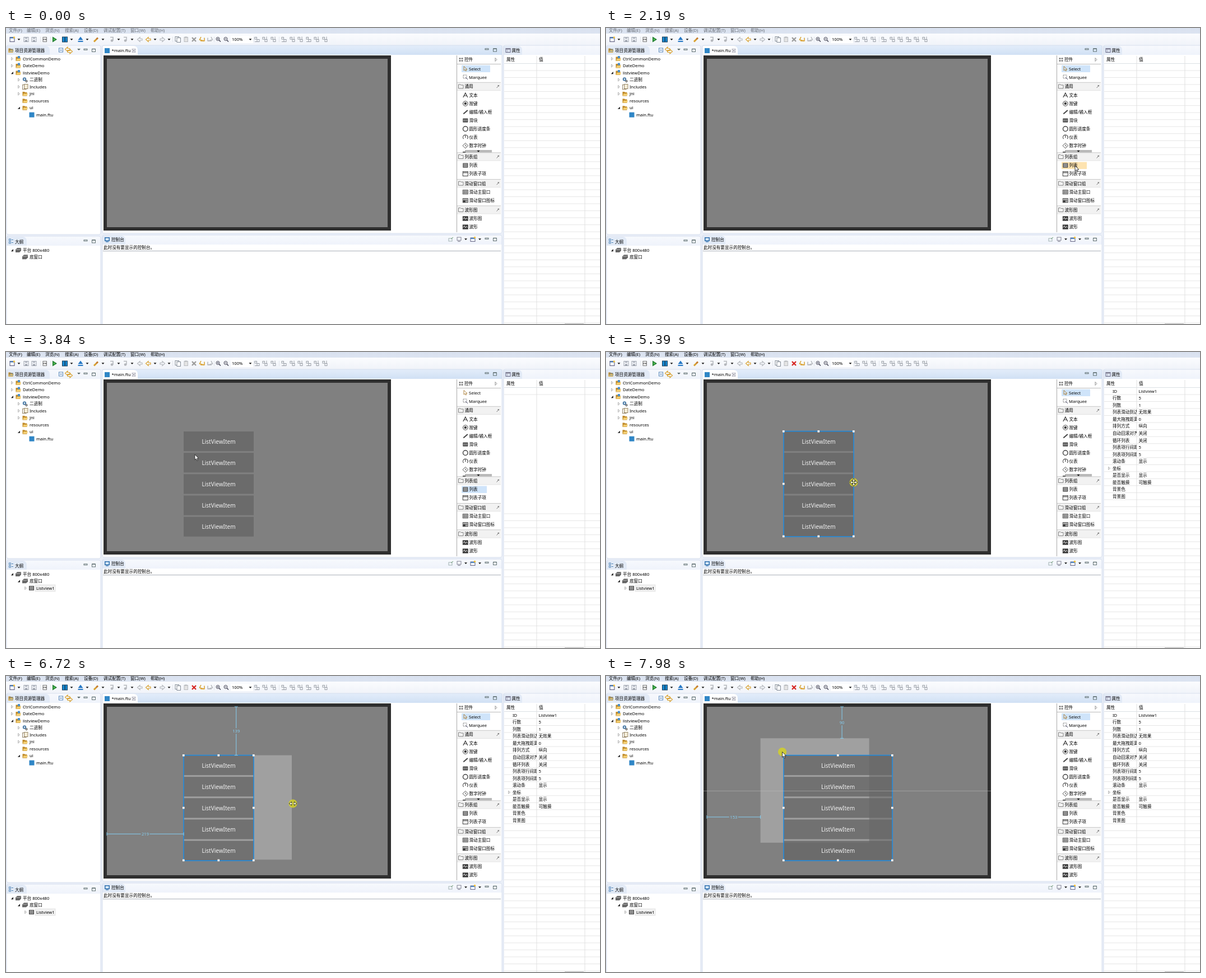
An HTML page with a canvas for the animation above (8000 ms loop, 1060 px wide and 529 px high).

```html
<!DOCTYPE html>
<html lang="zh">
<head>
<meta charset="utf-8">
<style>
  html, body { margin: 0; width: 100%; height: 100%; overflow: hidden; background: #fff; }
  canvas { display: block; }
</style>
</head>
<body>
<canvas id="stage" width="1060" height="529"></canvas>
<script>
const ctx = document.getElementById('stage').getContext('2d');
const LOOP = 8000;
const FAMILY = "'Noto Sans','Open Sans','Noto Sans CJK SC',sans-serif";
const GOLD = '#d9a02e', GREY = '#b4b7bc', INK = '#3c3c3c', SELECT = '#cfe4fa', HOVER = '#fde3b0';

// Drawing helpers
function rect(x, y, w, h, c) { ctx.fillStyle = c; ctx.fillRect(x, y, w, h); }
function box(x, y, w, h, c, lw = 1) { ctx.strokeStyle = c; ctx.lineWidth = lw; ctx.strokeRect(x, y, w, h); }
function trace(pts) {
  ctx.beginPath();
  for (let i = 0; i < pts.length; i += 2) ctx.lineTo(pts[i], pts[i + 1]);
}
function line(c, lw, ...pts) { trace(pts); ctx.strokeStyle = c; ctx.lineWidth = lw; ctx.stroke(); }
function poly(c, ...pts) { trace(pts); ctx.fillStyle = c; ctx.fill(); }
function disc(x, y, r, c) { ctx.beginPath(); ctx.arc(x, y, r, 0, 7); ctx.fillStyle = c; ctx.fill(); }
function ring(x, y, r, c, lw = 1, a = 0, b = 7) {
  ctx.beginPath(); ctx.arc(x, y, r, a, b); ctx.strokeStyle = c; ctx.lineWidth = lw; ctx.stroke();
}
function text(s, x, y, c = '#000', size = 7.6, weight = 400, align = 'left') {
  ctx.font = `${weight} ${size}px ${FAMILY}`;
  ctx.textAlign = align;
  ctx.fillStyle = c;
  ctx.fillText(s, x, y + size * 0.37);
}
function gradient(x, y, w, h, top, bottom) {
  const g = ctx.createLinearGradient(0, y, 0, y + h);
  g.addColorStop(0, top); g.addColorStop(1, bottom);
  rect(x, y, w, h, g);
}
const drop = (x, y, c = '#111') => poly(c, x - 2.5, y - 1.3, x + 2.5, y - 1.3, x, y + 1.5);

function twist(x, y, open) {
  if (open) poly('#222', x + 2, y - 2, x + 2, y + 2.2, x - 2.2, y + 2.2);
  else line('#999', 0.8, x - 1.3, y - 2.5, x + 1.5, y, x - 1.3, y + 2.5, x - 1.3, y - 2.5);
}
function arrow(x, y, dir, c) {
  line(c, 1.2, x - 4 * dir, y - 1.5, x, y - 1.5, x, y - 4, x + 4.5 * dir, y, x, y + 4, x, y + 1.5, x - 4 * dir, y + 1.5, x - 4 * dir, y - 1.5);
}
function folder(x, y, c = '#f3cf74') {
  poly('#c08a28', x - 4.5, y - 3.5, x - 1, y - 3.5, x, y - 2.5, x + 3.5, y - 2.5, x + 3.5, y + 4, x - 4.5, y + 4);
  poly(c, x - 2.5, y - 0.3, x + 5.2, y - 0.3, x + 3.2, y + 3.4, x - 4, y + 3.4);
}
const appIcon = (x, y) => rect(x - 4.5, y - 4.5, 9, 9, '#2f86c6');
function page(x, y, c = '#5b7fae', fill = '#fff') { rect(x - 3, y - 4, 6.5, 8, fill); box(x - 3, y - 4, 6.5, 8, c, 0.9); }
function grid(x, y, c = INK) {
  rect(x - 4.5, y - 4, 9, 8, c);
  for (let i = 0; i < 3; i++) rect(x - 3.5, y - 2.8 + i * 2.2, 7, 1, '#eee');
}
function bars(x, y, c = INK) {
  box(x - 4.5, y - 3.5, 9, 7, c);
  for (let i = -1; i < 2; i++) line(c, 1, x + i * 2.3, y - 3, x + i * 2.3, y + 3);
  line(c, 0.7, x - 4, y, x + 4, y);
}
function layers(x, y) {
  poly('#666', x - 5, y + 4, x - 5, y - 1, x - 2, y - 4, x + 5, y - 4, x + 5, y + 1, x + 2, y + 4);
  line('#ddd', 0.7, x - 4, y - 1.2, x + 2.5, y - 1.2, x + 4.5, y - 3);
}
function windowButtons(x, y) {
  box(x - 3, y - 2.2, 6, 2, '#566', 0.9);
  box(x + 11.5, y - 2, 6, 5, '#566', 0.9);
  line('#566', 1.2, x + 11.5, y - 2, x + 17.5, y - 2);
}
function panel(x, y, w, h, tabW, blue) {
  rect(x, y, w, h, '#fff');
  gradient(x, y, w, 17, blue ? '#e3edfa' : '#f7f9fd', blue ? '#d0e0f4' : '#eff3fb');
  ctx.beginPath(); ctx.roundRect(x, y + 1, tabW, 16, [2, 7, 0, 0]);
  ctx.fillStyle = blue ? '#fff' : '#e2eaf6'; ctx.fill();
  ctx.strokeStyle = '#d0d9ea'; ctx.lineWidth = 0.8;
  ctx.beginPath(); ctx.roundRect(x, y, w, h, 3); ctx.stroke();
}

function toolbar(t) {
  rect(0, 0, 1060, 529, '#eaeff8');
  gradient(0, 0, 1060, 10, '#d9e1ef', '#dce4f1');
  gradient(0, 10, 1060, 21, '#fbfcfe', '#f0f3f9');
  const menu = '文件(F) 编辑(E) 浏览(N) 搜索(A) 设备(D) 调试配置(T) 窗口(W) 帮助(H)'.split(' ');
  const menuX = [5, 37, 70, 105, 139, 174, 222, 258];
  menu.forEach((s, i) => text(s, menuX[i], 4.3, t < 2500 ? '#666b73' : '#000'));

  const y = 20.5;
  box(7, y - 4, 8, 8, '#557'); rect(7, y - 4, 8, 2, '#4d82bd'); rect(13, y - 5, 3, 3, '#f0c040');
  [36, 50].forEach(x => { box(x - 4, y - 4, 8, 8, '#9ba1ac'); rect(x - 2, y - 4, 4, 3, '#b5bac4'); rect(x - 2, y + 1, 4, 3, '#9ba1ac'); });
  page(69, y, '#666'); text('010', 69.3, y + 0.5, '#333', 3.6, 700, 'center');
  poly('#1c7a2b', 83, y - 5, 91, y, 83, y + 5); poly('#53bd55', 84.5, y - 2.5, 88.5, y, 84.5, y + 2.5);
  rect(100, y - 5, 10, 10, '#153b58'); rect(101, y - 4, 3.5, 8, '#1787cf'); rect(106, y - 4, 3, 8, '#1787cf');
  poly('#2678c5', 128.5, y + 1, 133, y - 5, 137.5, y + 1); rect(128.5, y + 2.5, 9, 2, '#2678c5');
  line(GOLD, 3, 157, y + 4, 161, y); line('#c47b2c', 3, 161, y, 164, y - 3);
  [189, 213].forEach(x => { line(GREY, 1.5, x - 3, y - 4, x + 2, y - 4, x + 2, y + 2); disc(x, y + 2, 2.3, GREY); });
  arrow(239, y, -1, GREY); arrow(254, y, -1, GOLD); arrow(279, y, 1, GREY);
  page(305, y - 1, '#77808c'); page(308, y + 1, '#77808c');
  page(321, y, GREY, '#e3e3e3'); rect(319, y - 5, 4, 2, GREY);
  const cross = isSelected(t) ? '#d6231f' : '#9a9a9a';
  line(cross, 2.3, 332, y - 3.5, 339, y + 3.5); line(cross, 2.3, 339, y - 3.5, 332, y + 3.5);
  [[350, -1, GOLD], [364, 1, GREY]].forEach(([x, d, c]) => {
    line(c, 1.5, x + 2 * d, y - 4.5, x + 4.5 * d, y + 0.5, x - 3 * d, y + 0.5 + 2);
    line(c, 1.5, x - 4 * d, y - 3, x - 4 * d, y + 2.5, x + 3 * d, y + 2.5);
  });
  [379, 393].forEach((x, i) => {
    ring(x - 1, y - 1, 3, '#445'); line('#445', 1.5, x + 1.2, y + 1.2, x + 4, y + 4);
    line('#445', 0.9, x - 2.5, y - 1, x + 0.5, y - 1);
    if (!i) line('#445', 0.9, x - 1, y - 2.5, x - 1, y + 0.5);
  });
  rect(401, 14, 40, 13, '#fff'); text('100%', 403, y);
  [448, 462, 477, 496, 511, 525, 540, 554, 569].forEach((x, i) => {
    box(x - 4, y - 4, 3.5, 3.5, '#90959d', 0.9); box(x, y, 4, 4, '#90959d', 0.9);
    if (i % 3) line('#90959d', 0.9, x + 3, y - 5, x + 3, y); else line('#90959d', 0.9, x - 4, y + 4, x, y + 4);
  });
  [23, 117, 145, 173, 201, 225, 266, 291, 436].forEach(x => drop(x, y));
  [61, 79, 297, 371, 442, 487].forEach(x => { for (let i = 0; i < 4; i++) rect(x, 16 + i * 2.5, 0.8, 1.2, '#c5cad3'); });
}

function projectTree() {
  panel(1, 31, 168, 338, 77);
  folder(9, 40); box(7, 38, 5, 4, '#5a84b5', 0.8);
  text('项目资源管理器', 16, 40);
  box(94.5, 36, 7, 7, '#4a7db3', 0.9); line('#4a7db3', 1, 96, 39.5, 100, 39.5);
  arrow(110, 38, -1, GOLD); arrow(114, 42, 1, GOLD);
  poly('#566', 127, 37, 133, 37, 130, 40); windowButtons(142, 39.5);
  const rows = [
    [0, 'CtrlCommonDemo', 0, 'project'], [0, 'DateDemo', 0, 'project'], [0, 'listviewDemo', 1, 'project'],
    [1, '二进制', 0, 'gear'], [1, 'Includes', 0, 'book'], [1, 'jni', 0, 'folder'],
    [1, 'resources', , 'folder'], [1, 'ui', 1, 'folder'], [2, 'main.ftu', , 'app']
  ];
  const icons = {
    folder, app: appIcon,
    project(x, y) { folder(x, y); rect(x - 1, y - 5, 4, 4, '#4a90cf'); },
    gear(x, y) { ring(x - 1, y - 1, 2.2, '#4d7da8', 2); ring(x + 2.5, y + 2.5, 1.5, '#555', 1.2); },
    book(x, y) { page(x - 1.5, y + 0.5, '#8b7a5a'); page(x + 1.5, y - 0.5, '#8b7a5a', '#f4ecd7'); }
  };
  rows.forEach(([depth, label, open, icon], i) => {
    const x = depth * 12, y = 55 + i * 12.52;
    if (open !== undefined) twist(11 + x, y, open);
    icons[icon](22 + x, y);
    text(label, 30 + x, y);
  });
}

function outline(t) {
  panel(1, 372, 168, 170, 36);
  [378, 383].forEach(y => { box(5.5, y - 1, 3, 3, '#4d82b4', 0.9); line('#4d82b4', 1, 10, y + 0.5, 13, y + 0.5); });
  text('大纲', 16, 382); windowButtons(142, 381);
  twist(11, 397, 1); layers(22, 397); text('平台 800x480', 30, 397);
  layers(34, 409.3); text('底窗口', 42, 409.3);
  if (t < 3430) return;
  twist(23, 409.3, 1); twist(35, 422, 0);
  rect(52, 416, 36, 12, '#f1f1f1'); box(52, 416, 36, 12, '#dcdcdc', 0.7);
  grid(45.5, 422); text('Listview1', 54, 422);
}

function consolePanel() {
  panel(172, 370, 713, 170, 41);
  rect(176, 374, 9, 7, '#2e6fae'); rect(177.5, 375.5, 6, 4, '#dcecfa'); rect(178, 381.5, 5, 1.2, '#2e6fae');
  text('控制台', 188, 378.5);
  box(790, 376, 6, 5, '#9aa', 0.9); line('#6a9a70', 1, 794, 377, 798, 374);
  box(805, 374, 7, 5.5, '#778', 0.9); line('#778', 1, 806, 381.5, 811, 381.5);
  box(829, 375, 8, 6.5, '#557', 0.9); rect(829, 375, 8, 2, '#4d82bd'); rect(835, 373, 3, 3, '#f0c040');
  drop(820.5, 377.5); drop(845.5, 377.5); windowButtons(858, 377.5);
  text('此时没有要显示的控制台。', 174, 392.5);
  line('#aab0b9', 1, 173, 398.5, 883, 398.5);
}

const groups = [
  ['通用', 104.5, ['文本', '按键', '编辑/输入框', '滑块', '圆形进度条', '仪表', '数字时钟']],
  ['列表组', 230, ['列表', '列表子项']],
  ['滑动窗口组', 277.7, ['滑动主窗口', '滑动窗口图标']],
  ['波形图', 325, ['波形图', '波形']]
];
const paletteIcons = [
  (x, y) => line('#333', 1.2, x - 4, y + 4, x, y - 4, x + 4, y + 4, x + 2.5, y + 1, x - 2.5, y + 1),
  (x, y) => { ring(x, y, 4.3, INK); disc(x, y, 2.3, INK); },
  (x, y) => line('#444', 2, x - 3.5, y + 3.5, x + 4, y - 3),
  (x, y) => { rect(x - 4.5, y - 3.5, 9, 7, INK); [-3, -0.5, 2].forEach(d => rect(x + d, y - 2, 1, 4, '#ddd')); },
  (x, y) => ring(x, y, 4.3, '#222', 1.2),
  (x, y) => { ring(x, y, 4.3, INK, 1.1, 2.4, 7); line(INK, 1.1, x, y + 1, x, y - 4); },
  (x, y) => { line(INK, 0.9, x, y - 4.8, x + 4.8, y, x, y + 4.8, x - 4.8, y, x, y - 4.8); line(INK, 0.9, x, y - 2, x, y, x + 2, y + 1); },
  grid,
  (x, y) => { box(x - 4.5, y - 4, 9, 8, INK); line(INK, 1.2, x - 4, y - 2, x + 4, y - 2); },
  bars, (x, y) => { bars(x, y); rect(x - 4, y, 4, 3.5, INK); }
];
function wave(x, y) {
  rect(x - 5, y - 4.2, 10, 8.4, INK);
  line('#fff', 0.9, x - 4, y + 1, x - 2, y - 2, x, y + 1.5, x + 2, y - 1, x + 4, y + 1);
}
function palette(t) {
  rect(804, 49, 80, 316, '#fff'); line('#aaa', 1, 804.5, 49, 804.5, 365);
  [[-2, -2], [2, -2], [-2, 2], [2, 2]].forEach(([dx, dy]) => disc(812 + dx, 56.5 + dy, 1.5, '#777'));
  text('控件', 818, 56.5); line('#777', 0.8, 873, 53.5, 876, 56.5, 873, 59.5, 873, 53.5);
  line('#bbb', 1, 805, 64.5, 883, 64.5);
  if (t < 2500 || isSelected(t)) rect(813, 66.5, 51, 12.5, SELECT);
  trace([817, 68.5, 817, 76, 819, 74.5, 820.5, 77, 821.5, 76.5, 820.5, 74, 823, 74]);
  ctx.closePath(); ctx.strokeStyle = '#a87a30'; ctx.lineWidth = 0.9; ctx.stroke();
  text('Select', 826, 72.7);
  ctx.setLineDash([1.5, 1.2]); box(816, 84, 6, 6, '#555', 0.9); ctx.setLineDash([]);
  line('#446', 1, 820, 88, 824, 92); text('Marquee', 826, 88);

  let n = 0;
  groups.forEach(([name, y, items]) => {
    rect(805, y - 7, 78, 14, '#f2f2f2'); line('#c8c8c8', 1, 805, y - 7.2, 883, y - 7.2); line('#ddd', 0.8, 805, y + 7, 883, y + 7);
    line('#777', 0.9, 807.5, y - 3.5, 811, y - 3.5, 812, y - 2.5, 816, y - 2.5, 816, y + 3.5, 807.5, y + 3.5, 807.5, y - 3.5);
    text(name, 818.5, y);
    line('#777', 1, 875.5, y + 2.5, 878, y); line('#777', 2, 877.5, y - 1, 880, y - 1.5);
    items.forEach((label, i) => {
      const iy = y + 15.5 + i * 15.05;
      if (label === '列表') {
        if (t >= 2150 && t < 2660) rect(813, iy - 6, 45, 12.5, HOVER);
        else if (t >= 2660 && !isSelected(t)) rect(813, iy - 6, 45, 12.5, SELECT);
      }
      (paletteIcons[n++] || wave)(819.8, iy);
      text(label, 826.5, iy);
    });
  });
  rect(819, 218, 48, 4.5, '#b9b9b9'); rect(815, 221, 5, 1.5, INK); drop(843, 220.3);
}

const properties = [
  ['ID', 'Listview1'], ['行数', '5'], ['列数', '1'], ['列表滑动到达', '无效果'], ['最大拖拽距离', '0'],
  ['排列方式', '纵向'], ['自动回滚对齐', '关闭'], ['循环列表', '关闭'], ['列表项行间距', '5'], ['列表项列间距', '5'],
  ['滚动条', '显示'], ['坐标', ''], ['是否显示', '显示'], ['能否触摸', '可触摸'], ['背景色', ''], ['背景图', '']
];
function propertyPanel(t) {
  panel(888, 31, 180, 510, 33);
  box(892, 36.5, 8, 7, '#557', 0.9); rect(892, 36.5, 8, 2, '#889'); line('#99a', 0.8, 895, 38, 895, 43);
  text('属性', 902.5, 40.5);
  text('属性', 893, 56.5); text('值', 951, 56.5);
  const row = c => y => line(c, 0.9, 889, y, 1060, y);
  row('#d9dde3')(63.5); row('#e4e4e4')(76);
  // While the table is being filled, the row lines retreat downwards.
  const filling = t >= 3430 && !isSelected(t);
  let y = filling ? 108 + 181 * Math.min(1, (t - 3430) / 410) : 88.5;
  for (; y < 529; y += 12.53) row('#e4e4e4')(y);
  [947, 1033].forEach(x => line('#dedede', 0.9, x, 50, x, 529));
  rect(997, 528, 34, 1, '#bbb');
  if (!isSelected(t)) return;
  properties.forEach(([key, value], i) => {
    const ry = 70 + i * 12.53;
    ctx.save(); ctx.beginPath(); ctx.rect(889, 50, 58, 479); ctx.clip();
    text(key, 904, ry); ctx.restore();
    text(value, 950.5, ry);
    if (key === '坐标') twist(898, ry, 0);
  });
}

// Pointer: time, x, y
const path = [
  [299, -20, 491], [300, 728, 491], [460, 198, 340], [520, -20, 310], [699, -20, 98], [700, 7, 98],
  [1480, 437, 162], [1800, 640, 262], [1960, 770, 305], [2190, 837, 246], [2580, 837, 246], [2820, 400, 60],
  [2900, 195, 45], [3050, 317.5, 142], [3430, 317.5, 142], [3840, 336.5, 183], [4070, 441, 214], [4500, 447, 243],
  [4930, 442, 233], [6240, 442, 233], [6720, 512, 228], [7000, 512, 228], [7430, 356, 166], [7600, 356, 166], [7980, 314.6, 135.7]
];
const presses = [[2500, 2620], [3280, 3430], [5390, 5620], [6170, 7000], [7600, 8000]];
const isSelected = t => t >= 3990;

function pointerAt(t) {
  const i = path.findIndex(k => k[0] > t);
  if (i === 0) return path[0].slice(1);
  if (i < 0) return path[path.length - 1].slice(1);
  const [t0, x0, y0] = path[i - 1], [t1, x1, y1] = path[i], f = (t - t0) / (t1 - t0);
  return [x0 + (x1 - x0) * f, y0 + (y1 - y0) * f];
}
function pointer(t, x, y) {
  if (presses.some(([a, b]) => t >= a && t < b)) disc(x, y, 7.6, 'rgba(210,208,40,.85)');
  ctx.save(); ctx.translate(x, y);
  if (t >= 4070 && t < 7000) {
    for (let i = 0, n = t < 6240 ? 4 : 2; i < n; i++) {
      ctx.rotate(Math.PI * 2 / n);
      const tip = [1, -0.7, 3, -0.7, 3, -2.4, 6, 0, 3, 2.4, 3, 0.7, 1, 0.7];
      line('#333', 1.6, ...tip); poly('#f6f6c8', ...tip);
    }
  } else {
    trace([0, 0, 0, 9.6, 2.2, 7.6, 3.8, 11.2, 5.4, 10.5, 3.9, 7.1, 6.8, 7]);
    ctx.closePath(); ctx.fillStyle = '#fff'; ctx.fill(); ctx.strokeStyle = '#222'; ctx.lineWidth = 0.9; ctx.stroke();
  }
  ctx.restore();
}

function guide(x, y, vertical) {
  const c = '#84cdf0', start = vertical ? 55 : 180, end = vertical ? y : x, mid = (start + end) / 2, gap = vertical ? 5 : 8;
  [[start, mid - gap], [mid + gap, end]].forEach(([a, b]) => vertical ? line(c, 1, x, a, x, b) : line(c, 1, a, y, b, y));
  [start, end].forEach(p => vertical ? line(c, 1, x - 3, p, x + 3, p) : line(c, 1, p, y - 3, p, y + 3));
  text(Math.round((end - start) * 1.6), vertical ? x : mid, vertical ? mid : y, c, 7.6, 400, 'center');
}

function editor(t, px, py) {
  panel(172, 31, 713, 336, 63, true);
  appIcon(180.5, 40.5); text('*main.ftu', 188.5, 40.5);
  box(225, 37.5, 6, 6, '#99a', 0.7); line('#778', 1, 226, 38.5, 230, 42.5); line('#778', 1, 230, 38.5, 226, 42.5);
  windowButtons(858, 39);
  rect(174, 49, 513, 313, '#2f2f2f'); rect(180, 55, 501, 301, '#808080');
  if (t < 3430) return;

  const x = 317, y = 141.6, w = t < 7000 ? 125 : 194, h = 187.6;
  const resizing = t >= 6320 && t < 7000, moving = t >= 7670;
  let gx = x, gy = y, gw = w;
  if (resizing) gw = Math.max(w, px - 2 - x);
  if (moving) { gx += px - 356; gy += py - 166; }
  if (resizing || moving) rect(gx, gy, gw, h - 1, 'rgba(255,255,255,.25)');

  for (let i = 0; i < 5; i++) {
    const iy = y + 0.4 + i * 38.15;
    rect(x, iy, w, 35.2, 'rgba(103,103,103,.81)');
    text('ListViewItem', x + w / 2, iy + 17.8, '#f2f2f2', 10, 300, 'center');
  }
  if (isSelected(t)) {
    box(x, y, w, h + 0.8, '#1c8ce3', 1.5);
    for (let i = 0; i < 9; i++) if (i !== 4) rect(x - 2 + (i % 3) * w / 2, y - 1.6 + Math.floor(i / 3) * h / 2, 3.6, 3.6, '#fff');
  }
  if (resizing || moving) {
    guide(gx + w * 0.75, gy, true);
    guide(gx, gy + h * 0.75, false);
  }
  if (moving && Math.abs(gy + h / 2 - 205.2) < 1.5) line('rgba(190,190,190,.6)', 0.8, 174, 205.5, 687, 205.5);
}

function render(t) {
  const [px, py] = pointerAt(t);
  toolbar(t);
  projectTree();
  outline(t);
  editor(t, px, py);
  palette(t);
  consolePanel();
  propertyPanel(t);
  pointer(t, px, py);
}
const start = performance.now();
function tick() {
  render((performance.now() - start) % LOOP);
  requestAnimationFrame(tick);
}
tick();
</script>
</body>
</html>
```
